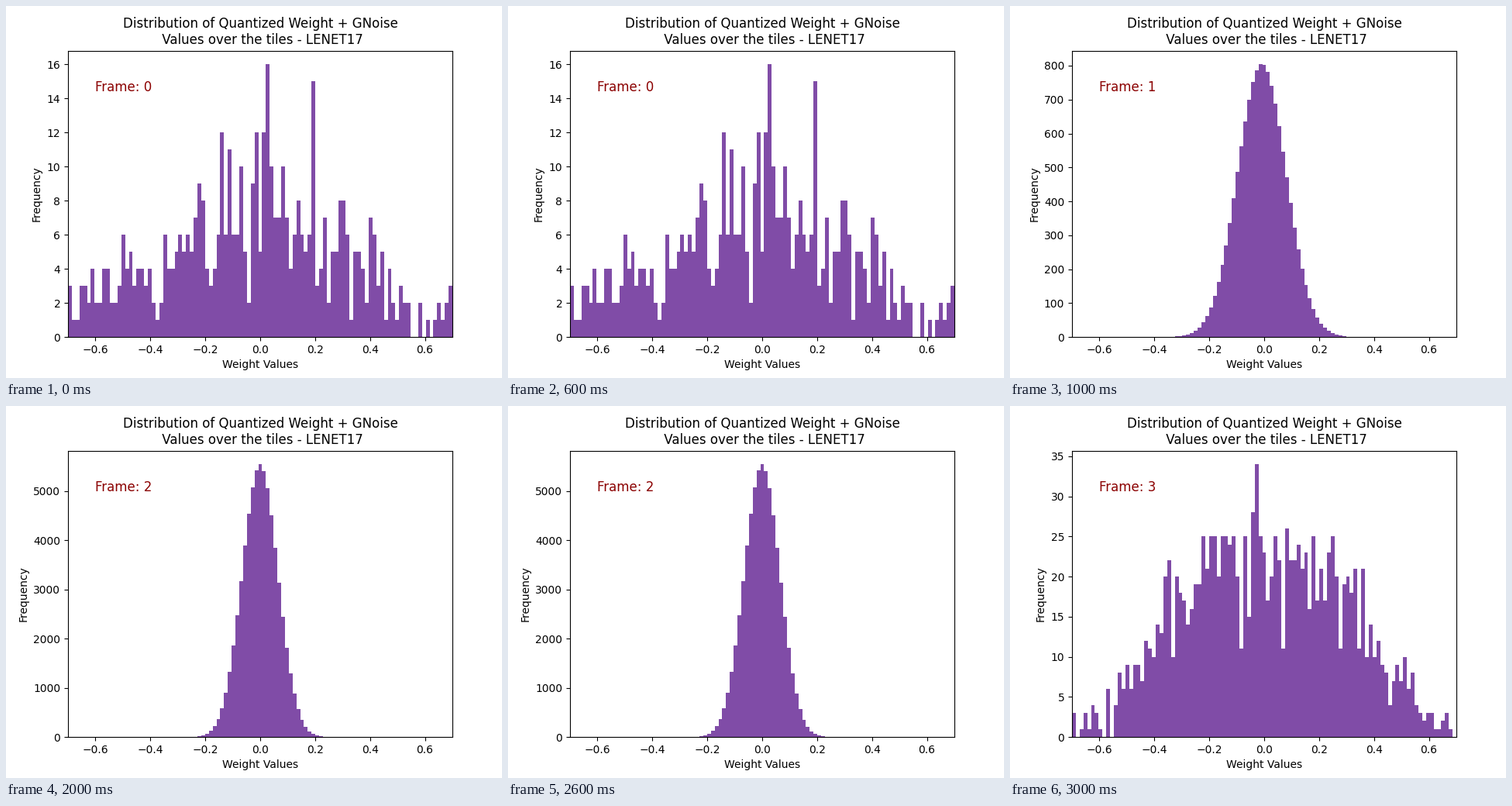
Write a matplotlib script that moves like this. It is 640x480 px and loops after 4000 ms.

```python
import matplotlib.pyplot as plt
import numpy as np
from matplotlib.animation import FuncAnimation

BINS = 101
EDGES = np.linspace(-0.7, 0.7, BINS + 1)


def bell(height, center, width, power=2):
    """Expected count in each bin; a higher power gives a flatter top."""
    distance = np.abs(np.arange(BINS) - center) / width
    return height * np.exp(-distance ** power)


def sparse(expected, peaks, seed):
    """Few samples: random counts around the expected ones, plus tall peaks."""
    limit = max(peaks.values()) * 3 // 4
    counts = np.random.default_rng(seed).poisson(expected).clip(max=limit)
    for k, count in peaks.items():
        counts[k] = count
    return counts


LAYERS = [
    sparse(bell(6.3, 50, 36.8), {14: 6, 33: 7, 45: 10, 48: 9, 52: 16, 53: 10,
                                 56: 10, 64: 15, 71: 8, 79: 7}, seed=4),
    bell(806, 49.4, 9).round(),
    bell(5548, 49.97, 6.66).round(),
    sparse(bell(21.5, 50, 34, power=3), {47: 28, 48: 34, 56: 26, 63: 25, 68: 25},
           seed=7),
]

fig, ax = plt.subplots(figsize=(6.4, 4.8), dpi=100)


def draw(i):
    counts = LAYERS[i]
    top = counts.max()
    ax.clear()
    ax.bar(EDGES[:-1], counts, width=np.diff(EDGES), align="edge",
           color="indigo", alpha=0.7)
    ax.set_xlim(-0.7, 0.7)
    ax.set_ylim(0, 1.05 * top)
    ax.set_title("Distribution of Quantized Weight + GNoise\n"
                 " Values over the tiles - LENET17")
    ax.set_xlabel("Weight Values")
    ax.set_ylabel("Frequency")
    ax.text(-0.6, 0.9 * top, f"Frame: {i}", fontsize=12, color="darkred")


anim = FuncAnimation(fig, draw, frames=len(LAYERS), init_func=lambda: None,
                     interval=1000, repeat=True)
plt.show()
```
